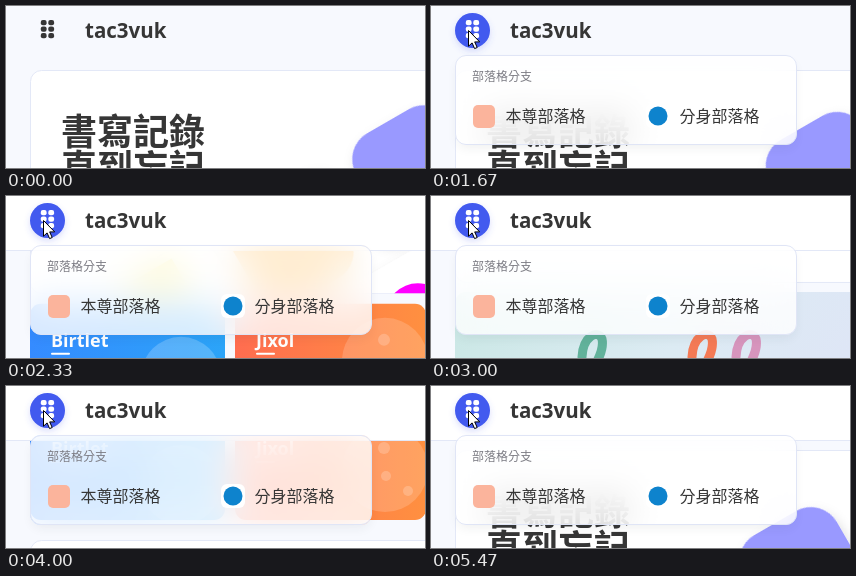
An HTML page that plays this animation: 419x162 px, repeating every 5.54 s.

```html
<!DOCTYPE html>
<html lang="zh-Hant">
<head>
<meta charset="utf-8">
<title>Blog menu</title>
<style>
  html, body { margin: 0; width: 100%; height: 100%; overflow: hidden; background: #f7f9fe; }
  body { position: relative; font-family: "Noto Sans CJK TC", "Noto Sans CJK SC", "Noto Sans CJK JP", "Noto Sans CJK", sans-serif; }
  svg { position: absolute; left: 0; top: 0; display: block; }
  .latin { font-family: "Noto Sans", "Open Sans", sans-serif; font-weight: 700; }
  .card { fill: #fff; stroke: #e3e8f7; }
  #menu {
    position: absolute; left: 24px; top: 49px; width: 342px; height: 90px;
    box-sizing: border-box; border: 1px solid #e0e5f6; border-radius: 11px;
    background: rgba(255, 255, 255, .8); backdrop-filter: blur(18px);
    box-shadow: 0 5px 12px -3px rgba(44, 45, 48, .08);
    transform-origin: 0 0; overflow: hidden;
  }
  #menu svg { left: -1px; top: -1px; }
</style>
</head>
<body>
<svg width="419" height="162" viewBox="0 0 419 162">
  <defs>
    <linearGradient id="blue"><stop stop-color="#358bff"/><stop offset="1" stop-color="#2ba4f8"/></linearGradient>
    <linearGradient id="orange"><stop stop-color="#ff6d50"/><stop offset="1" stop-color="#ff9040"/></linearGradient>
    <linearGradient id="cover" y2=".3"><stop stop-color="#c9e7e4"/><stop offset=".5" stop-color="#dcebf3"/><stop offset="1" stop-color="#dfe4f7"/></linearGradient>
    <clipPath id="heroClip"><rect x="24.5" y="64.5" width="460" height="221" rx="11"/></clipPath>
    <filter id="soft" x="-30%" y="-30%" width="160%" height="160%">
      <feDropShadow dx="0" dy="6" stdDeviation="6" flood-color="#2c2d30" flood-opacity=".14"/>
    </filter>
    <filter id="glow" x="-50%" y="-50%" width="200%" height="200%">
      <feDropShadow dx="0" dy="3" stdDeviation="3" flood-color="#425aef" flood-opacity=".2"/>
    </filter>
  </defs>
  <g id="page">
    <rect class="card" x="24.5" y="64.5" width="460" height="221" rx="11"/>
    <g clip-path="url(#heroClip)"><g id="tiles"></g></g>
    <g font-size="36" font-weight="700" fill="#363636">
      <text x="55" y="138.5">書寫記錄</text>
      <text x="55" y="174.5">直到忘記</text>
    </g>
    <g id="topics"></g>
    <g fill="#fff">
      <circle cx="175" cy="369" r="40" opacity=".2"/>
      <circle cx="379" cy="353" r="43" opacity=".17"/>
      <g opacity=".2"><circle cx="380" cy="360" r="5"/><circle cx="402" cy="375" r="5"/><circle cx="378" cy="332" r="6"/></g>
    </g>
    <rect class="card" x="24.5" y="424.5" width="460" height="36" rx="11"/>
    <rect x="24" y="470" width="461" height="220" rx="11" fill="url(#cover)"/>
    <g id="curls" fill="none" stroke-width="9" stroke-linecap="round"></g>
  </g>
  <g id="bar">
    <rect width="419" height="54" fill="#fff"/>
    <rect y="54" width="419" height="1" fill="#e3e8f7"/>
  </g>
  <circle id="disc" cx="41.5" cy="24.5" r="17.5" fill="#425aef" filter="url(#glow)"/>
  <g id="dots"></g>
  <text class="latin" x="79" y="32" font-size="20.5" fill="#363636">tac3vuk</text>
</svg>
<div id="menu">
  <svg width="342" height="90" viewBox="24 49 342 90">
    <text x="41" y="75" font-size="12" fill="#7c7c84">部落格分支</text>
    <rect x="42" y="99" width="22" height="23" rx="5" fill="#fbb49c"/>
    <rect x="215" y="98" width="24" height="24" rx="6" fill="#fff"/>
    <circle cx="227" cy="110" r="9.5" fill="#0e83cd"/>
    <g font-size="16" fill="#363636">
      <text x="74.5" y="116">本尊部落格</text>
      <text x="248.5" y="116">分身部落格</text>
    </g>
  </svg>
</div>
<svg width="419" height="162" viewBox="0 0 419 162">
  <path id="cursor" d="M.5 .5V16.2L4.1 12.9L6.6 18.6L9.2 17.5L6.7 11.9H11.7Z" fill="#fff" stroke="#000"/>
</svg>
<script>
const LOOP = 5540, STEP = 1000 / 15, DRIFT = 8 / 1000;
const $ = id => document.getElementById(id);
const set = (id, name, value) => $(id).setAttribute(name, value);
const clamp = x => Math.max(0, Math.min(1, x));
const ease = x => x * x * (3 - 2 * x);
const linear = x => x;
const fade = (t, from, to) => ease(clamp((t - from) / (to - from)));

// Eased value between [time, value] stops
function track(t, stops, curve = ease) {
  let value = stops[0][1];
  for (let i = 1; i < stops.length; i++) {
    const [t0, v0] = stops[i - 1], [t1, v1] = stops[i];
    if (t >= t0) value = v0 + (v1 - v0) * curve(clamp((t - t0) / (t1 - t0)));
  }
  return value;
}

const square = (x, y, size, r, fill, extra = '') =>
  `<rect x="${-size / 2}" y="${-size / 2}" width="${size}" height="${size}" rx="${r}" fill="${fill}"
    transform="translate(${x} ${y}) rotate(-30)" ${extra}/>`;
const tile = (x, y, fill) => square(x, y, 108, 30, fill, 'filter="url(#soft)"');

$('tiles').innerHTML =
  tile(409, 162, '#9999ff') +
  tile(301, 226, '#ff9a00') +
  tile(193, 289, '#fff') + square(169, 289, 70, 0, '#f5de19') +
  tile(423, 295, '#fff') + '<circle cx="428" cy="298" r="32" fill="#f0f"/>';

const topic = (x, width, fill, name) =>
  `<rect x="${x}" y="296" width="${width}" height="108" rx="11" fill="url(#${fill})"/>
   <text class="latin" x="${x + 21}" y="339" font-size="18" fill="#fff">${name}</text>
   <rect x="${x + 21}" y="345" width="19" height="2" rx="1" fill="#fff"/>`;
$('topics').innerHTML = topic(24, 195, 'blue', 'Birtlet') + topic(229, 191, 'orange', 'Jixol');

$('curls').innerHTML = [[161, '#62b29b'], [271, '#f47a55'], [315, '#d795bd']].map(([x, color]) =>
  `<path d="M${x - 10} 535C${x - 9} 514 ${x + 6} 507 ${x + 10} 517C${x + 13} 530 ${x + 1} 548 ${x - 9} 562" stroke="${color}"/>`).join('');

$('dots').innerHTML = [0, 1, 2, 3, 4, 5].map(i =>
  `<rect x="${34.8 + (i % 2) * 7.5}" y="${13.9 + (i >> 1) * 6.5}" width="5.8" height="5.4" rx="2.1"/>`).join('');

const scrollStops = [[1840, 0], [2210, 125], [2480, 270], [2630, 270], [2810, 360],
  [2930, 360], [3210, 450], [3420, 450], [4000, 270], [4440, 270], [5090, 0]];
const cursorX = [[430, -14], [600, 2], [900, 9], [1200, 23], [1340, 37]];
const cursorY = [[430, 152], [600, 132], [900, 80], [1200, 35], [1340, 24]];

function draw(time) {
  const t = Math.floor((time + 4) / STEP) * STEP;
  const drift = t * DRIFT;
  set('page', 'transform', `translate(0 ${-track(t, scrollStops)})`);
  set('tiles', 'transform', `translate(${-drift * .866} ${drift * .5})`);
  set('bar', 'opacity', fade(t, 1850, 2050));

  const hover = fade(t, 1250, 1420);
  const shade = Math.round(54 + 201 * hover);
  set('disc', 'opacity', hover);
  set('dots', 'fill', `rgb(${shade},${shade},${shade})`);

  const open = fade(t, 1270, 1580);
  $('menu').style.opacity = open;
  $('menu').style.transform = open < 1 ? `scale(${.8 + .2 * open})` : 'none';
  set('cursor', 'transform', `translate(${track(t, cursorX, linear)} ${track(t, cursorY, linear)})`);
}

const start = performance.now();
function tick() {
  draw((performance.now() - start) % LOOP);
  requestAnimationFrame(tick);
}
tick();
</script>
</body>
</html>
```
